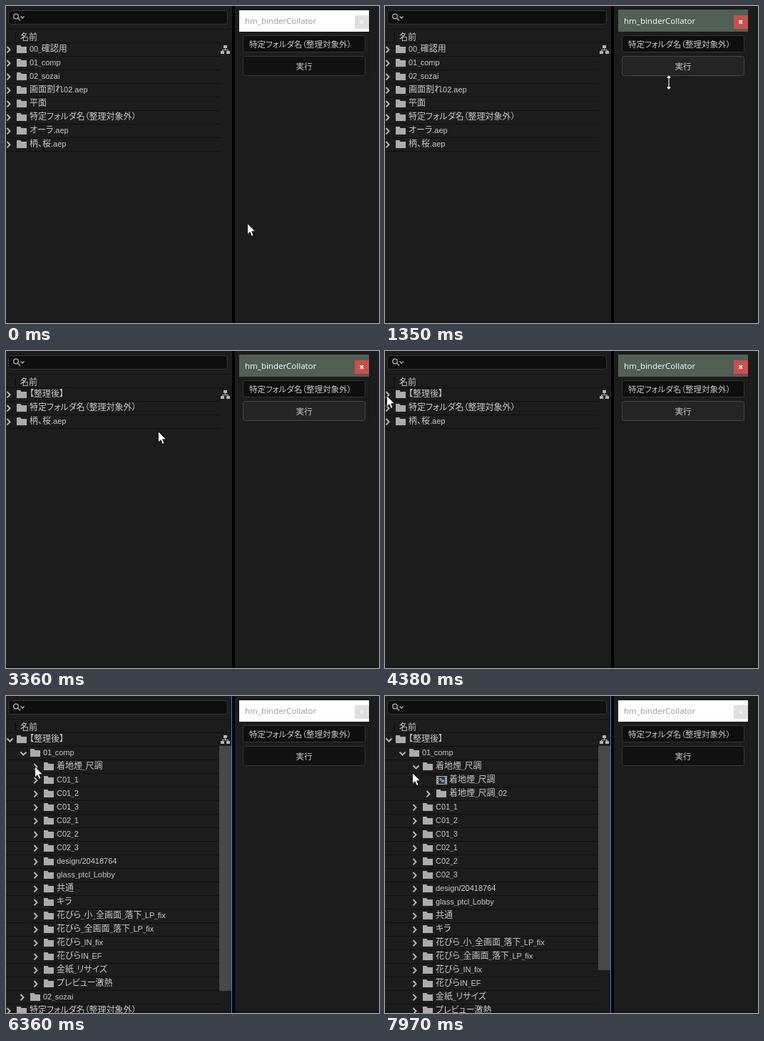
An HTML page that plays this animation: 523 by 444 pixels, repeating every 8000 ms.

```html
<!DOCTYPE html>
<html lang="ja">
<head>
<meta charset="utf-8">
<title>Folder tidy demo</title>
<style>
  html, body { margin: 0; width: 100%; height: 100%; overflow: hidden; background: #1c1c1c; }
  svg { display: block; }
  text { font: 12px "Noto Sans CJK JP", "Noto Sans CJK", sans-serif; font-feature-settings: "palt"; fill: #c8c8c8; }
  .latin { font: 11px "Liberation Sans", sans-serif; }
  .underscore { font: 8px "Liberation Sans", sans-serif; }
  .title { font: 11.5px "Open Sans", sans-serif; }
  .field text { font-size: 11.5px; }
</style>
</head>
<body>
<svg id="stage" width="523" height="444" viewBox="0 0 523 444"></svg>
<script>
const LOOP = 8000, TICK = 120;
const FOCUS = 870, RUN = 2830, BLUR = 4630;
const ROW = 19, FIRST_ROW = 60, VIEW = 378.5;
const GREY = '#b4b4b4';
const stage = document.getElementById('stage');

function add(parent, tag, attrs = {}, content = '') {
  const el = document.createElementNS('http://www.w3.org/2000/svg', tag);
  set(el, attrs);
  el.textContent = content;
  return parent.appendChild(el);
}
function set(el, attrs) {
  for (const key in attrs) el.setAttribute(key, attrs[key]);
}
const show = (el, on) => set(el, { display: on ? 'inline' : 'none' });
const rect = (parent, x, y, width, height, fill, more) =>
  add(parent, 'rect', { x, y, width, height, fill, ...more });
const path = (parent, d, more) => add(parent, 'path', { d, fill: 'none', ...more });

// Latin runs get a narrower face than the Japanese ones, underscores a short one.
function label(parent, x, y, str, more) {
  const el = add(parent, 'text', { x, y, ...more });
  for (const run of str.match(/_|[ -^`-~]+|[^ -~]+/g)) {
    const style = run === '_' ? 'underscore' : /[ -~]/.test(run) ? 'latin' : '';
    add(el, 'tspan', { class: style }, run);
  }
}

function drawCompIcon(row) {
  rect(row, 15, -5, 15, 12, GREY);
  rect(row, 18, -4, 9, 10, '#26364c');
  for (let y = -4; y < 6; y += 3)
    for (const x of [16, 28]) rect(row, x, y, 1, 1.5, '#333');
  add(row, 'circle', { cx: 21, cy: 0, r: 2, fill: '#d05a4a' });
  add(row, 'circle', { cx: 24, cy: 2, r: 2, fill: '#6fa3d8' });
}

function drawRow(parent, index, [depth, name, kind]) {
  const g = add(parent, 'g', { transform: `translate(0 ${FIRST_ROW + ROW * index})` });
  rect(g, 0, 10, 300, 1, '#0f0f0f');
  const row = add(g, 'g', { transform: `translate(${ROW * depth} 0)` });
  if (kind === 'comp') {
    drawCompIcon(row);
  } else {
    const chevron = kind === 'open' ? 'M1.5 -.5L5.5 3.5L9.5 -.5' : 'M1.5 -3L5.5 1.2L1.5 5.4';
    path(row, chevron, { stroke: GREY, 'stroke-width': 2 });
    path(row, 'M15 -5H20.5L21.5 -3H29V6H15Z', { fill: '#acacac' });
  }
  label(row, 33, 4, name);
}

// Project panel
rect(stage, 0, 0, 523, 444, '#1c1c1c');
rect(stage, 0, 441, 523, 3, '#171717');
rect(stage, 3.5, 6.5, 307, 19, '#0e0e0e', { rx: 3.5, stroke: '#343434' });
add(stage, 'circle', { cx: 14, cy: 14.5, r: 3.3, fill: 'none', stroke: GREY, 'stroke-width': 1.3 });
path(stage, 'M16.5 17L20 20.5M20.5 14.5L23 17L25.5 14.5', { stroke: GREY, 'stroke-width': 1.4 });
rect(stage, 0, 32, 316, 1, '#121212');
rect(stage, 12, 37, 2, 12, '#101010');
label(stage, 20, 48, '名前');
rect(stage, 0, 51, 316, 1, '#0f0f0f');
path(stage, 'M305 55H310V59H305ZM301 63H306V67H301ZM309 63H314V67H309Z', { fill: GREY });
path(stage, 'M307.5 59V61.5M303.5 63V61.5H311.5V63', { stroke: GREY });

// Tree contents at each stage of the work
const SKIPPED = '特定フォルダ名（整理対象外）', SMOKE = '着地煙_尺調';
const cuts = ['C01', 'C02'].flatMap(cut => [1, 2, 3].map(n => `${cut}_${n}`));
const comps = [...cuts, 'design/20418764', 'glass_ptcl_Lobby', '共通', 'キラ',
  '花びら_小_全画面_落下_LP_fix', '花びら_全画面_落下_LP_fix', '花びら_IN_fix', '花びらIN_EF',
  '金紙_リサイズ', 'プレビュー激熱'].map(name => [2, name]);
const tail = [[0, SKIPPED], [0, '柄、桜.aep']];
const root = kind => [0, '【整理後】', kind];
const openComps = [root('open'), [1, '01_comp', 'open']];
const sozai = [1, '02_sozai'];
const trees = [
  { at: 0, rows: ['00_確認用', '01_comp', '02_sozai', '画面割れ02.aep', '平面', SKIPPED,
    'オーラ.aep', '柄、桜.aep'].map(name => [0, name]) },
  { at: RUN, rows: [root(), ...tail] },
  { at: 4750, rows: [root('open'), [1, '01_comp'], sozai, ...tail] },
  { at: 5870, rows: [...openComps, [2, SMOKE], ...comps, sozai, ...tail] },
  { at: 6880, rows: [...openComps, [2, SMOKE, 'open'], [3, SMOKE, 'comp'], [3, SMOKE + '_02'],
    ...comps, sozai, ...tail] },
];
for (const tree of trees) {
  tree.el = add(stage, 'g');
  tree.rows.forEach((row, i) => drawRow(tree.el, i, row));
  const height = tree.rows.length * ROW;
  if (height > VIEW) rect(tree.el, 299, 70, 17, Math.round(VIEW * VIEW / height), '#484848');
}

// Divider and script window
rect(stage, 317, 0, 4, 444, '#000');
const focusLine = rect(stage, 316, 0, 1, 444, '#3c7fe6');
rect(stage, 509, 36, 1, 62, '#161616');
const titleBar = rect(stage, 327, 5, 182, 31, '#fff');
const titleText = add(stage, 'text', { x: 335, y: 25, class: 'title' }, 'hm_binderCollator');
const closeBox = rect(stage, 489, 13, 20, 19, '#e0e0e0');
const closeMark = path(stage, 'M496.5 20L501 25M501 20L496.5 25', { 'stroke-width': 1.5 });
const form = add(stage, 'g', { class: 'field' });
rect(form, 332.5, 41.5, 171, 23, '#0e0e0e', { rx: 3, stroke: '#333' });
label(form, 341, 58, SKIPPED);
const button = rect(form, 332.5, 70.5, 171, 27, '#111', { rx: 3 });
label(form, 418, 88.5, '実行', { 'text-anchor': 'middle' });

// Pointers
const white = { fill: '#fff', stroke: '#000', 'stroke-width': .8 };
const arrow = path(stage, 'M.5 .5V16L4 12.7L6.4 18.4L9 17.3L6.6 11.8H11.5Z', white);
const resize = path(stage, 'M0 -10.5L4 -6H1V6H4L0 10.5L-4 6H-1V-6H-4Z', white);

// The pointer glides to each stop, moving once per tick.
const chevronAt = level => ({ x: 2 + ROW * level, y: 62 + 18 * level });
const onButton = { x: 409, y: 88 };
const glides = [
  { start: 0, ticks: 2, x: 396, y: 135 },
  { start: 270, ticks: 4, x: 430, y: 18 },
  { start: 1110, ticks: 2, x: 398, y: 107 },
  { start: 1350, ticks: 2, ...onButton },
  { start: 3090, ticks: 4, x: 17, y: 95, bend: 20 },
  { start: 3630, ticks: 6, ...chevronAt(0) },
  { start: 5030, ticks: 1, x: 3, y: 69 },
  { start: 5150, ticks: 6, ...chevronAt(1) },
  { start: 6240, ticks: 1, ...chevronAt(2) },
  { start: 6880, ticks: 1, ...chevronAt(3), y: 125 },
  { start: 7300, ticks: 3, x: 64, y: 159 },
  { start: 7700, ticks: 2, x: 38, y: 107 },
];
const ease = p => p * p * (3 - 2 * p);

function pointerAt(t) {
  let x = 338, y = 304;
  for (const stop of glides) {
    if (t < stop.start) break;
    const p = ease(Math.min(1, Math.floor((t - stop.start) / TICK) / stop.ticks));
    x += (stop.x - x) * p;
    y += (stop.y - y) * p + (stop.bend || 0) * Math.sin(Math.PI * p);
  }
  return { x: Math.round(x), y: Math.round(y) };
}

function render(t) {
  const current = trees.findLast(tree => tree.at <= t);
  for (const tree of trees) show(tree.el, tree === current);

  const { x, y } = pointerAt(t);
  const active = t >= FOCUS && t < BLUR;
  const overForm = active && x > 332;
  const hover = overForm && y > 70 && y < 98 && t < RUN;
  const resizing = overForm && y > 98;

  set(titleBar, active ? { fill: '#515f54', y: 5, height: 31 } : { fill: '#fff', y: 6, height: 30 });
  titleText.style.fill = active ? '#fff' : '#999';
  set(closeBox, { fill: active ? '#c75050' : '#e0e0e0' });
  set(closeMark, { stroke: active ? '#fff' : '#f4f4f4' });
  set(button, hover ? { fill: '#474747', stroke: '#747474' }
    : active ? { fill: '#242424', stroke: '#454545' }
    : { fill: '#111', stroke: '#353535' });
  show(focusLine, t >= BLUR);

  show(arrow, !resizing);
  show(resize, resizing);
  set(resizing ? resize : arrow, { transform: `translate(${x} ${y})` });
}

const start = performance.now();
function tick() {
  render((performance.now() - start) % LOOP);
  requestAnimationFrame(tick);
}
tick();
</script>
</body>
</html>
```
